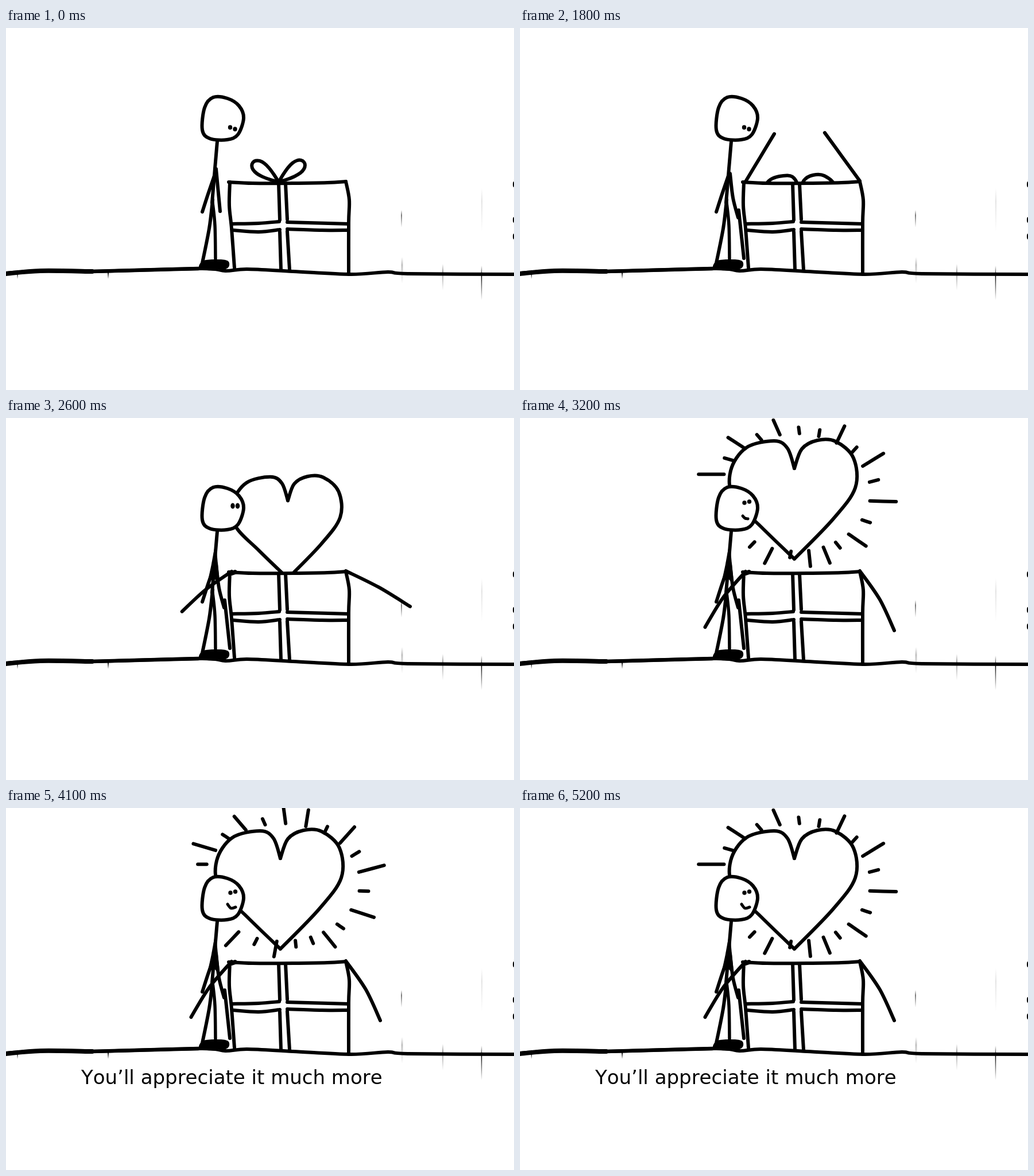
These frames come from a looping animation (885 px wide and 632 px high, 5300 ms). An HTML page with a canvas:

```html
<!DOCTYPE html>
<html lang="en">
<head>
<meta charset="utf-8">
<title>Gift</title>
<style>
html, body { margin: 0; width: 100%; height: 100%; overflow: hidden; background: #fff; }
canvas { display: block; }
</style>
</head>
<body>
<canvas id="stage" width="885" height="632"></canvas>
<script>
const ctx = document.getElementById('stage').getContext('2d');
const LOOP = 5300, STEP = 100, LID_Y = 269, PEN = 6;
const { PI, sin, cos } = Math;

const lerp = (a, b, u) => a + (b - a) * u;
const progress = (t, from, to) => Math.min(1, Math.max(0, (t - from) / (to - from)));

// keys: [time, values...] in rising order of time
function tween(keys, t) {
  const i = keys.findIndex(k => k[0] >= t);
  if (i === 0) return keys[0].slice(1);
  if (i < 0) return keys[keys.length - 1].slice(1);
  const a = keys[i - 1], b = keys[i];
  const u = progress(t, a[0], b[0]);
  return a.slice(1).map((v, j) => lerp(v, b[j + 1], u));
}

// Smooth curve through a flat x, y list
function trace(p, closed = false) {
  const n = p.length / 2;
  const at = i => {
    const k = closed ? (i + n) % n : Math.min(n - 1, Math.max(0, i));
    return [p[2 * k], p[2 * k + 1]];
  };
  ctx.beginPath();
  ctx.moveTo(p[0], p[1]);
  for (let i = 0; i < (closed ? n : n - 1); i++) {
    const [a, b, c, d] = [at(i - 1), at(i), at(i + 1), at(i + 2)];
    ctx.bezierCurveTo(b[0] + (c[0] - a[0]) / 6, b[1] + (c[1] - a[1]) / 6,
      c[0] - (d[0] - b[0]) / 6, c[1] - (d[1] - b[1]) / 6, c[0], c[1]);
  }
}

function line(p, width = PEN) {
  trace(p);
  ctx.lineWidth = width;
  ctx.stroke();
}

function blob(p, fill = '#000') {
  trace(p, true);
  ctx.fillStyle = fill;
  ctx.fill();
}

function dot(x, y, rx, ry = rx) {
  ctx.beginPath();
  ctx.ellipse(x, y, rx, ry, 0, 0, 2 * PI);
  ctx.fillStyle = '#000';
  ctx.fill();
}

// Vertical mark that fades out at both ends
function streak(x, top, bottom, alpha, width = 1.5) {
  const fade = ctx.createLinearGradient(0, top, 0, bottom);
  fade.addColorStop(0, 'rgba(0,0,0,0)');
  fade.addColorStop(.3, `rgba(0,0,0,${alpha})`);
  fade.addColorStop(1, 'rgba(0,0,0,0)');
  ctx.fillStyle = fade;
  ctx.fillRect(x - width / 2, top, width, bottom - top);
}

function drawGround() {
  line([0,428, 60,424, 150,425, 340,420, 382,424, 420,421, 500,425, 600,430, 665,426, 700,429, 885,430]);
  line([0,429, 60,424, 150,425], 8);
  line([150,425, 335,420], 6.5);
  for (const x of [20, 178]) streak(x, 422, 438, 1, 2);
  for (const y of [273, 335, 364]) dot(885, y, 2, 5);
  streak(828.5, 415, 475, 1);
  streak(761, 412, 458, .5);
  streak(689, 318, 348, .7);
  streak(690, 400, 446, .25, 3);
  streak(829, 280, 355, .15);
}

function drawBox() {
  line([390,269, 389,310, 393,350, 398,419]);
  line([388,269, 430,271, 500,271, 560,270, 592,268]);
  line([592,268, 598,300, 597,340, 597,430]);
  line([475,272, 477,335]);
  line([477,356, 479,422]);
  line([487,272, 490,334]);
  line([490,355, 494,422]);
  line([394,342, 440,341, 476,338]);
  line([490,339, 597,342]);
  line([396,353, 440,356, 477,352]);
  line([490,351, 550,353, 597,353]);
}

// side is 1 for the left flap, -1 for the right; keys: [time, angle, length]
function drawFlap(t, x, y, side, keys) {
  const [degrees, length] = tween(keys, t);
  const c = cos(degrees * PI / 180), s = sin(degrees * PI / 180);
  const bulge = 6 * Math.max(0, -s);
  line([x, y,
    x + side * (c * length / 2 + s * bulge), y - s * length / 2 + c * bulge,
    x + side * c * length, y - s * length]);
}

function drawHeart(t) {
  const [x, y, scale] = tween([[1500, 487, 392, .6], [1800, 487, 381, .6],
    [2600, 491, 280, .86], [3000, 478, 246, 1]], t);
  const half = p => line(p.map((v, i) => i % 2 ? y + (v - 246) * scale : x + (v - 478) * scale));
  ctx.save();
  ctx.beginPath();
  ctx.rect(0, 0, 885, LID_Y);
  ctx.clip();
  half([478,88, 466,53, 443,40, 394,52, 367,92, 372,140, 420,190, 478,246]);
  half([478,88, 491,54, 518,39, 550,41, 581,70, 584,122, 545,177, 478,246]);
  ctx.restore();
}

// Long and short rays on an ellipse, swapping places on every step
function drawRays(phase) {
  for (let i = 0; i < 20; i++) {
    const a = (198 + 15 * i + 12 * Math.exp(-(((i - 13) / 2.2) ** 2))) * PI / 180;
    const heading = (180 + 16.5 * i) * PI / 180;
    const shift = i > 5 && i < 16 ? 1 : 0;
    const long = (i + phase + shift) % 2;
    const reach = long ? 27 + 19 * cos(a) ** 2 : 11 + 5 * cos(a) ** 2;
    const x = 480 + (137 - 6 * phase) * cos(a), y = 130 + 103 * sin(a);
    line([x, y, x + reach * cos(heading), y + reach * sin(heading)]);
  }
}

// Teardrop from the knot to a tip at (dx, dy)
function drawLoop(dx, dy, width) {
  const p = [], size = Math.hypot(dx, dy);
  for (let i = 0; i <= 12; i++) {
    const out = sin(PI * i / 12), across = width * sin(2 * PI * i / 12) / size;
    p.push(475 + dx * out - dy * across, 269 + dy * out + dx * across);
  }
  line(p);
}

const handAt = t => tween([[0, 373, 320], [300, 409, 295], [600, 427, 241],
  [800, 416, 246], [1200, 375, 312], [1400, 380, 331]], t);

function drawRibbon(t) {
  const loose = progress(t, 600, 1000);
  if (loose < 1) drawLoop(44 * (1 - loose ** 2), -35 * (1 - loose) ** 1.5, 11 * (1 - loose));
  if (t <= 600) return drawLoop(-45, -34, 11);

  const [hx, hy] = handAt(t);
  const [ex, ey] = tween([[800, 473, 269], [1200, 383, 368], [1400, 390, 402]], t);
  const slack = 1 - progress(t, 800, 1300), p = [];
  for (let u = 0; u <= 1; u += .125)
    p.push(lerp(hx + 1, ex, u), lerp(hy - 13, ey, u) - slack * (11 * sin(PI * u) + 2 * sin(5 * PI * u)));
  line(p);
}

function drawArm(t) {
  const [x, y] = handAt(t);
  const sy = lerp(246, 254, progress(t, 0, 600));
  const slump = 4 * progress(t, 800, 1400);
  line([366, sy, (366 + x) / 2 - slump / 2, (sy + y) / 2 + slump, x, y]);
}

function drawFace(t) {
  const head = [361,121, 386,123, 406,136, 414,157, 404,186, 385,195, 355,193, 342,178, 346,139];
  blob(head, '#fff');
  trace(head, true);
  ctx.lineWidth = PEN;
  ctx.stroke();

  const [x, y, tilt, height] = tween([[1900, 390.5, 173.5, 3, 4], [2300, 395, 153.5, 0, 5],
    [2600, 395, 153.5, 0, 5], [2900, 391, 148, -2, 3.8]], t);
  dot(x, y, 3.7, height);
  dot(x + 8.5, y + tilt, 3.7, height);
  if (t >= 3100) {
    const grin = progress(t, 3200, 3600);
    line([388 - 2 * grin, 171 - 3 * grin, 392, 175, 397 + 3 * grin, 176 - 3 * grin], 5);
  }
}

function drawFigure(t) {
  line([368,198, 364,245, 359,305]);
  line([364,255, 352,290, 342,321]);
  line([360,300, 354,350, 341,415]);
  line([360,305, 364,345, 365,407], 5.5);
  blob([336,419, 344,406, 372,404, 387,407, 388,417, 376,423, 350,423]);
  if (t >= 2500) blob([365,225, 370,265, 371,288, 360,280, 350,298, 358,255]);
  drawArm(t);
  drawFace(t);
}

function draw(t) {
  ctx.fillStyle = '#fff';
  ctx.fillRect(0, 0, 885, 632);
  ctx.lineCap = ctx.lineJoin = 'round';

  drawGround();
  if (t >= 1600) drawHeart(t);
  drawBox();
  drawFigure(t);
  drawRibbon(t);
  if (t >= 1300) {
    drawFlap(t, 393, 268, 1, [[1200, 0, 96], [1800, 59, 97], [2400, 180, 97], [2600, 219, 111], [2900, 234, 120]]);
    drawFlap(t, 592, 267, -1, [[1200, 0, 100], [1800, 54, 104], [2400, 180, 105], [2600, 209, 128], [2900, 240, 120]]);
  }
  if (t >= 2500) line([393,271, 399,269], 8);
  if (t >= 3000) drawRays(t / STEP % 2 ? 0 : 1);
  if (t >= 3800) {
    ctx.fillStyle = '#000';
    ctx.font = '34px "DejaVu Sans", sans-serif';
    ctx.fontKerning = 'none';
    ctx.fillText('You’ll appreciate it much more', 131, 482);
  }
}

const start = performance.now();
function tick() {
  const t = (performance.now() - start) % LOOP;
  draw(Math.floor(t / STEP) * STEP);
  requestAnimationFrame(tick);
}
tick();
</script>
</body>
</html>
```
